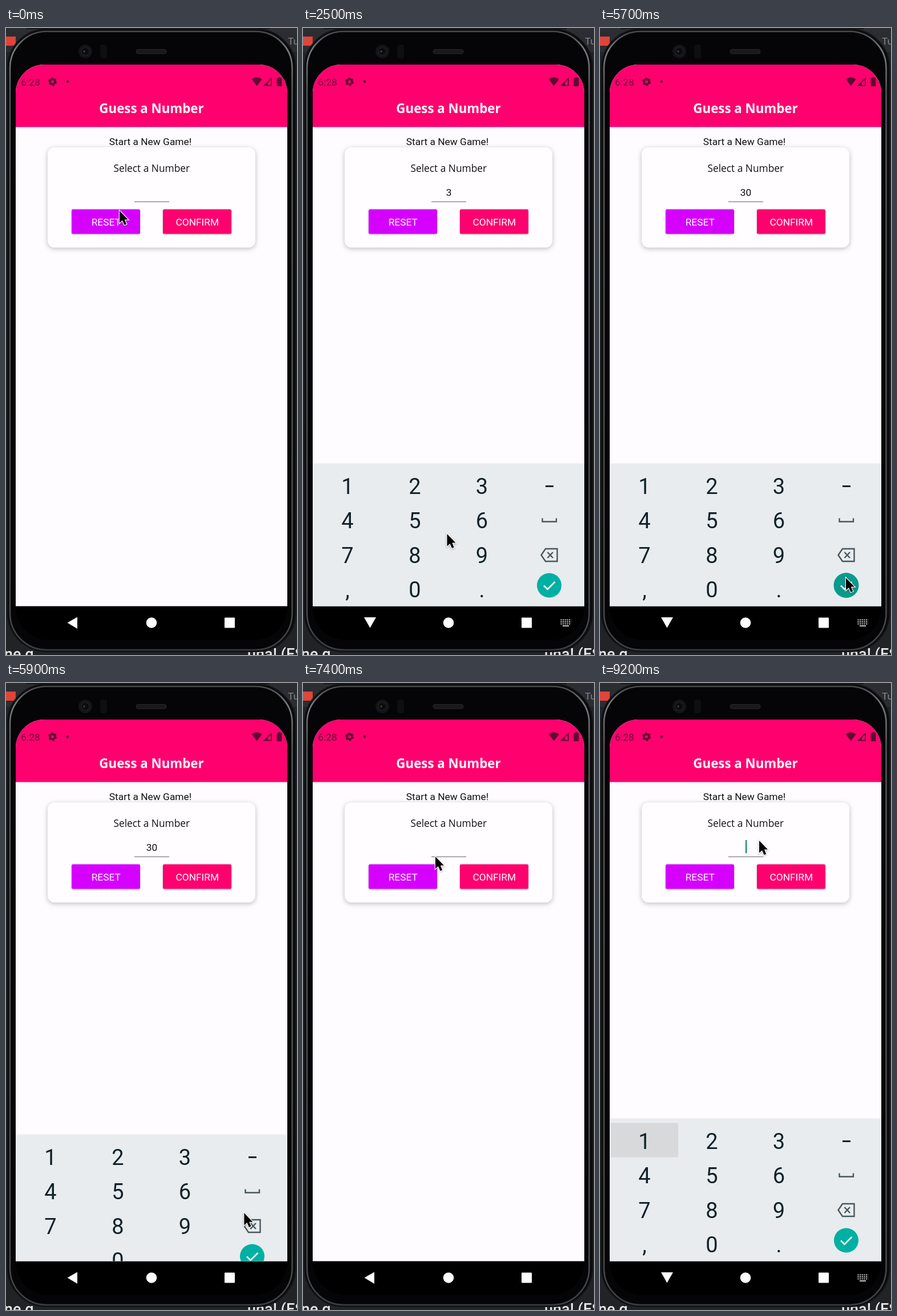
An HTML page that plays this animation: 510 by 1098 pixels, repeating every 9.3 s.

```html
<!DOCTYPE html>
<html lang="en">
<head>
<meta charset="utf-8">
<title>Guess a Number</title>
<style>
  html, body { margin: 0; width: 100%; height: 100%; overflow: hidden; background: #222327; }
  svg { display: block; width: 510px; height: 1098px; }
  text { font-family: Roboto, "Noto Sans", sans-serif; font-size: 17.35px; fill: #111; }
  .open { font-family: "Open Sans", "Noto Sans", sans-serif; }
  .title { font-size: 22.3px; font-weight: 700; fill: #fff; }
  .mid { text-anchor: middle; }
  .label { fill: #fff; text-anchor: middle; }
  .key { font-size: 38px; fill: #10222a; text-anchor: middle; }
  .page { font-size: 27px; font-weight: 500; fill: #e6e6e8; }
  .soft { filter: drop-shadow(0 2px 4px rgba(0,0,0,.26)); }
  .lift { filter: drop-shadow(0 1.5px 1.5px rgba(0,0,0,.3)); }
</style>
</head>
<body>
<svg viewBox="0 0 510 1098">
  <defs>
    <linearGradient id="rim" x1="0" y1="0" x2="0" y2="1">
      <stop offset="0" stop-color="#48494b"/>
      <stop offset=".03" stop-color="#7c7d80"/>
      <stop offset=".1" stop-color="#55565a"/>
      <stop offset=".94" stop-color="#48494c"/>
      <stop offset="1" stop-color="#3c3d40"/>
    </linearGradient>
    <clipPath id="screen"><path d="M17 1012.5V114a50 50 0 0 1 50-50H443a50 50 0 0 1 50 50V1012.5Z"/></clipPath>
  </defs>

  <!-- page behind the phone -->
  <rect width="510" height="1098" fill="#222327"/>
  <rect width="510" height="42" fill="#2c2d32"/>
  <rect x="36" width="426" height="2" fill="#17181b"/>
  <rect x="0" y="15" width="17" height="16" fill="#e0443a"/>
  <text x="494" y="29" style="fill:#85868a">Tu</text>
  <text class="page" x="-3" y="1106">ne g</text>
  <text class="page" x="423" y="1106">una! (ES</text>

  <!-- phone body -->
  <rect x="2.5" y="2" width="505" height="1090" rx="68" fill="#0b0b0d" stroke="#141517" stroke-width="2"/>
  <rect x="7" y="6" width="494.5" height="1083" rx="64" fill="#050507" stroke="url(#rim)" stroke-width="2.6"/>
  <circle cx="139" cy="41" r="12" fill="#131416"/>
  <circle cx="139" cy="41" r="7" fill="#0a0b0d" stroke="#1b1c20" stroke-width="2"/>
  <circle cx="137" cy="41" r="2" fill="#34353a"/>
  <rect x="165" y="29" width="12" height="24" rx="4" fill="#0e0f11"/>
  <rect x="228" y="37.5" width="53" height="7.5" rx="3.5" fill="#19191b" stroke="#29292b"/>
  <path d="M17 1012H493V1014a58 58 0 0 1-58 58H75a58 58 0 0 1-58-58Z" fill="#000"/>

  <g clip-path="url(#screen)">
    <rect x="17" y="64" width="476" height="949" fill="#fefcfe"/>
    <rect x="17" y="64" width="476" height="109.5" fill="#ff006e"/>

    <!-- status bar -->
    <g fill="#5c0c30">
      <text x="26.3" y="101" style="fill:#6b0c3a">6:28</text>
      <circle cx="81.5" cy="94" r="4.3" fill="none" stroke="#5c0c30" stroke-width="3.4"/>
      <circle cx="81.5" cy="94" r="6.4" fill="none" stroke="#5c0c30" stroke-width="2.2" stroke-dasharray="3.7 3"/>
      <circle cx="108" cy="94" r="2.4"/>
      <path d="M431 90Q439.5 82.5 448.5 90L439.7 101.5Z"/>
      <path d="M465 88.5V100.7H452.5Z" fill="none" stroke="#5c0c30" stroke-width="1.7"/>
      <path d="M459 95V101H453Z"/>
      <path d="M477 86h4v1.5h2.3v14.5h-8.8V87.5h2.5Z"/>
    </g>
    <text class="open title mid" x="255" y="149">Guess a Number</text>

    <!-- game card -->
    <text class="mid" x="253" y="205">Start a New Game!</text>
    <rect class="soft" x="73" y="209" width="364" height="175.5" rx="12" fill="#fffdff"/>
    <text class="open mid" x="255.3" y="252">Select a Number</text>
    <rect x="225" y="303.7" width="61" height="1.2" fill="#77777b"/>
    <text id="value" class="mid" x="255.5" y="294"></text>
    <rect id="caret" y="275" width="2.2" height="23" fill="#0b8578"/>
    <rect class="lift" x="115" y="317.5" width="120" height="43" rx="2.5" fill="#d600ff"/>
    <text class="label" x="175.3" y="346">RESET</text>
    <rect id="dim" x="17" y="173.5" width="476" height="222.5" fill="#000" opacity=".093"/>
    <rect id="confirm" class="lift" x="275" y="317.5" width="120" height="43" rx="2.5"/>
    <text class="label" x="335.3" y="346">CONFIRM</text>

    <g id="pad">
      <rect x="17" y="762" width="476" height="2" fill="#f1f3f5"/>
      <rect x="17" y="763.5" width="476" height="250" fill="#e8ecef"/>
      <rect id="hit" width="118" height="60" fill="#d7d9db"/>
      <g id="keys"></g>
      <g fill="none" stroke="#48565d" stroke-width="2.4">
        <path d="M425 802.5h14" stroke="#10222a" stroke-width="2.8"/>
        <path d="M419.5 858.5v6h24.5v-6"/>
        <path d="M425 912h20.5v22H425L417.5 923ZM428.5 918l9.5 10M438 918l-9.5 10"/>
      </g>
      <circle id="done" cx="431.5" cy="976" r="21.5"/>
      <path d="M422 976.5l6.5 6.5L441.5 970" fill="none" stroke="#fff" stroke-width="2.5"/>
    </g>
  </g>

  <!-- navigation bar -->
  <g fill="#fff">
    <path id="back" d="M107.5 1041.5L125 1031.5V1052Z"/>
    <path id="hide" d="M107 1032H128L117.5 1050.5Z"/>
    <circle cx="255" cy="1041.5" r="9.3"/>
    <rect x="383" y="1032.5" width="18" height="18" rx="1"/>
    <g id="kbd" stroke="#ddd" fill="none" stroke-width="1.8">
      <path d="M451.5 1036.5H470M451.5 1040H470M451.5 1043.5H470" stroke-dasharray="2 1.6"/>
      <path d="M455 1047H466"/>
    </g>
  </g>

  <path id="mouse" class="lift" d="M1 2V23.5L6 19L9.6 27L13.2 25.4L9.8 17.6H16Z" fill="#000" stroke="#fff" stroke-width="2.4" paint-order="stroke"/>
</svg>

<script>
const LOOP = 9300, STEP = 100;
const COLS = [78, 196, 313.5], ROWS = [802, 862.5, 923, 983.5];
const $ = id => document.getElementById(id);
const show = (id, on) => $(id).style.display = on ? '' : 'none';
const within = (t, a, b) => t >= a && t < b;

// time, x, y of the pointer tip
const route = [
  [0, 198, 318], [700, 247, 289], [1300, 247, 289],
  [1900, 309, 798], [2200, 309, 798], [2800, 194, 970], [3000, 194, 970],
  [3700, 204, 376], [4500, 204, 376], [5500, 430, 961], [5800, 430, 961],
  [6500, 184, 330], [7000, 184, 330], [7800, 278, 274], [LOOP, 278, 274]
];

// start, end, column, row of each highlighted key
const presses = [[2000, 2200, 2, 0], [2900, 3100, 1, 3], [9200, LOOP, 0, 0]];

const labels = ['1', '2', '3', '4', '5', '6', '7', '8', '9', ',', '0', '.'];
$('keys').innerHTML = labels.map((s, i) =>
  `<text class="key" x="${COLS[i % 3]}" y="${ROWS[i / 3 | 0] + 13.5}">${s}</text>`).join('');

function pointer(t) {
  const i = route.findIndex(p => p[0] > t);
  const [t0, x0, y0] = route[i - 1], [t1, x1, y1] = route[i];
  const u = (t - t0) / (t1 - t0), k = u * u * (3 - 2 * u);
  return [x0 + (x1 - x0) * k, y0 + (y1 - y0) * k];
}

function padHeight(t) {
  const rise = start => 1 - (1 - Math.min(1, (t - start) / 400)) ** 4;
  if (within(t, 800, 5800)) return rise(800);
  if (within(t, 5800, 6100)) return 1 - ((t - 5800) / 300) ** 2;
  return t >= 8800 ? rise(8800) : 0;
}

function caretOn(t) {
  const focused = within(t, 800, 5800) || t >= 8800;
  const since = [8800, 2900, 2000, 800].find(s => t >= s);
  return focused && (t - since) % 1000 < 500;
}

function draw(t) {
  const text = within(t, 2000, 2900) ? '3' : within(t, 2900, 6800) ? '30' : '';
  $('value').textContent = text;
  $('caret').setAttribute('x', 255 + text.length * 4.9);
  show('caret', caretOn(t));

  const up = padHeight(t);
  $('pad').setAttribute('transform', `translate(0 ${(1 - up) * 252})`);
  show('pad', up > 0);
  const open = within(t, 800, 5900) || t >= 8800;
  show('hide', open);
  show('kbd', open);
  show('back', !open);

  const press = presses.find(p => within(t, p[0], p[1]));
  show('hit', press);
  if (press) {
    $('hit').setAttribute('x', COLS[press[2]] - 59);
    $('hit').setAttribute('y', ROWS[press[3]] - 31.5);
  }
  const held = within(t, 5600, 5900);
  $('done').setAttribute('fill', held ? '#0a9a8d' : '#00b0a2');
  $('done').setAttribute('r', held ? 22 : 21.5);

  const dimmed = within(t, 6600, 6800);
  show('dim', dimmed);
  $('confirm').setAttribute('fill', dimmed ? '#f5006a' : '#ff006e');
  $('mouse').setAttribute('transform', `translate(${pointer(t)})`);
}

const began = performance.now();
function tick() {
  const t = (performance.now() - began) % LOOP;
  draw(Math.floor(t / STEP) * STEP);
  requestAnimationFrame(tick);
}
draw(0);
requestAnimationFrame(tick);
</script>
</body>
</html>
```
